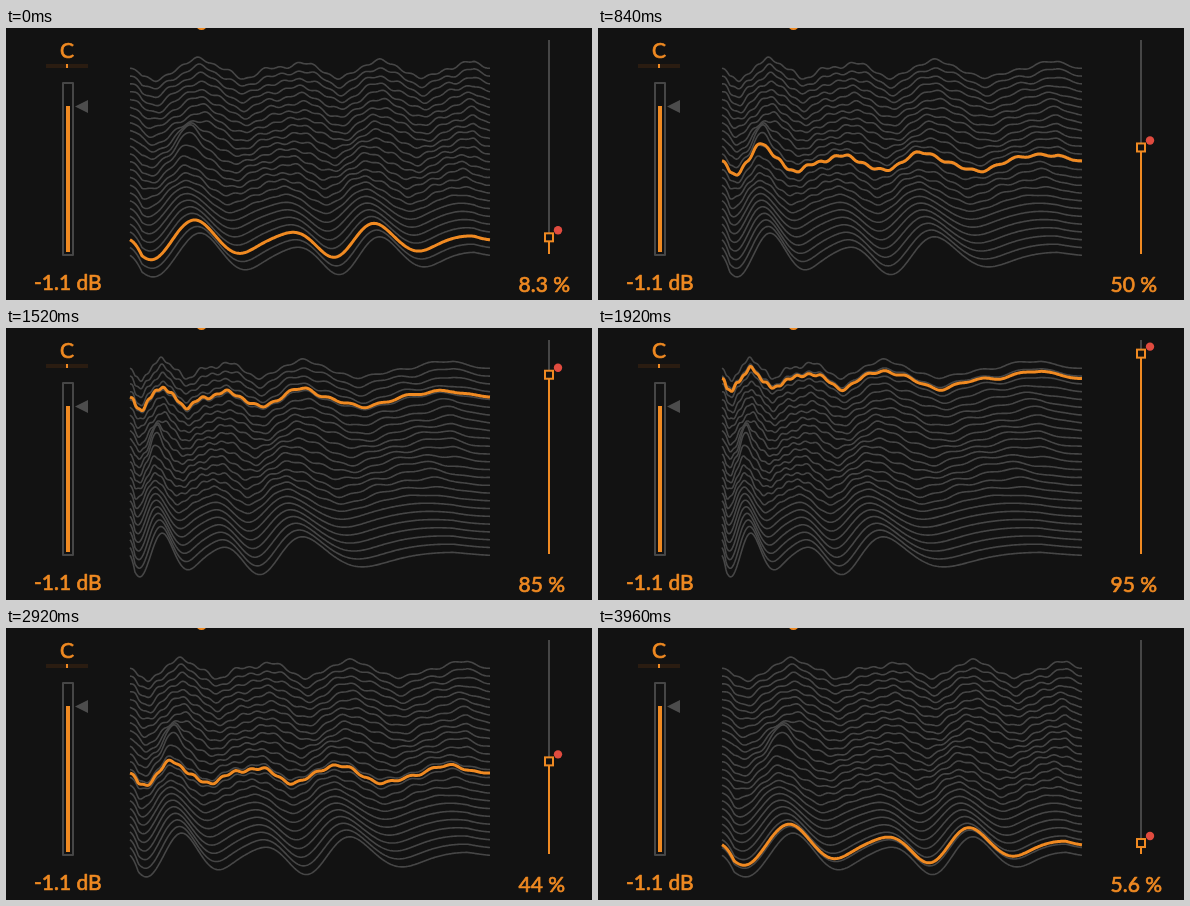
Recreate the animation shown at these times as an HTML page with a canvas. Size 586x272 px, loop 4000 ms.

```html
<!DOCTYPE html>
<html lang="en">
<head>
<meta charset="utf-8">
<title>Wavetable position</title>
<style>
  html, body { margin: 0; width: 100%; height: 100%; overflow: hidden; background: #121212; }
  canvas { display: block; }
</style>
</head>
<body>
<canvas id="stage" width="586" height="272"></canvas>
<script>
const ctx = document.getElementById('stage').getContext('2d');
const LOOP = 4000, STEP = 40;
const ROWS = 24, LEFT = 124, WIDTH = 360;
const BG = '#121212', GREY = '#464646', ORANGE = '#f08a22', RED = '#e04b3f';

// Swells along every wave: centre, height in the bottom row, height in the upper rows.
const swells = [
  [24, 22, 13], [70, -23, -10], [114, 15, 10], [171, -9, -5],
  [210, 21, 10], [248, -20, -8], [293, 12, 10], [344, -3, -7]
];

const mix = (a, b, k) => a + (b - a) * k;
const clamp = v => Math.max(0, Math.min(1, v));
const bell = (v, centre, spread) => Math.exp(-(((v - centre) / spread) ** 2));

function waveOffset(row, x) {
  const lift = clamp(row / 10);
  const spread = mix(23, 15, row / ROWS);
  const lean = 14 * Math.sin(Math.PI * clamp(row / 16)) * clamp(x / 50);
  const rough = 2.2 * clamp((row - 6) / 3);
  let y = -14 * bell(x, 57, 10) * bell(row, 13.3, 1.9);
  for (const [centre, low, high] of swells) y += mix(low, high, lift) * bell(x + lean, centre, spread);
  y += rough * Math.sin(x * 0.27 + row * 0.9) * Math.sin(x * 0.11 - row * 0.4);
  return y * clamp(x / 12) * clamp((WIDTH - x) / 16);
}

function drawWave(row, bend, color, width) {
  ctx.beginPath();
  for (let x = 0; x <= WIDTH; x++) {
    const u = x / WIDTH;
    const source = WIDTH * u * bend / (1 - u + u * bend);
    ctx.lineTo(LEFT + x, 227.3 - 187 * row / ROWS + waveOffset(row, source));
  }
  ctx.strokeStyle = color;
  ctx.lineWidth = width;
  ctx.stroke();
}

function rect(x, y, w, h, color) {
  ctx.fillStyle = color;
  ctx.fillRect(x, y, w, h);
}

function label(text, x, y, align = 'left') {
  ctx.font = '21px Lato, sans-serif';
  ctx.textAlign = align;
  ctx.fillStyle = ctx.strokeStyle = ORANGE;
  ctx.lineWidth = 0.7;
  ctx.fillText(text, x, y);
  ctx.strokeText(text, x, y);
}

function drawMeter() {
  label('C', 61, 30, 'center');
  rect(40, 36, 42, 4, '#2a1c11');
  rect(60, 36, 2, 4, ORANGE);
  ctx.strokeStyle = GREY;
  ctx.lineWidth = 2;
  ctx.strokeRect(57, 55, 10, 172);
  rect(60, 78, 4, 146, ORANGE);
  ctx.fillStyle = '#4c4c4c';
  ctx.beginPath();
  ctx.moveTo(69, 78.5);
  ctx.lineTo(82, 72);
  ctx.lineTo(82, 85);
  ctx.fill();
  label('-1.1 dB', 28, 262);
}

function drawSlider(value) {
  const y = 227 - 213 * value;
  rect(542, 12, 2, 214, GREY);
  rect(542, y, 2, Math.max(0, 226 - y), ORANGE);
  rect(538, y - 5, 10, 10, ORANGE);
  rect(540, y - 3, 6, 6, BG);
  ctx.fillStyle = RED;
  ctx.beginPath();
  ctx.arc(552, y - 7, 4.2, 0, 7);
  ctx.fill();
  const percent = value * 100;
  label(percent.toFixed(percent < 10 ? 1 : 0) + ' %', 512.5, 264);
}

// Rises, falls at the same pace, rests briefly at zero and starts again.
function positionAt(t) {
  const keys = [[0, 0.083], [1819, 0.9965], [3789, 0], [3876, 0], [LOOP, 0.083]];
  const i = keys.findIndex(key => t < key[0]);
  const [t0, v0] = keys[i - 1], [t1, v1] = keys[i];
  return mix(v0, v1, (t - t0) / (t1 - t0));
}

function frame() {
  const t = Math.floor(performance.now() % LOOP / STEP) * STEP;
  const value = positionAt(t);
  const bend = 0.956 + 0.387 * value + 1.635 * value * value;
  rect(0, 0, 586, 272, BG);

  // Descender of a heading cut off by the top edge.
  ctx.beginPath();
  ctx.arc(195.5, -3.5, 4.5, 0, Math.PI);
  ctx.strokeStyle = ORANGE;
  ctx.lineWidth = 2;
  ctx.stroke();

  drawMeter();
  ctx.lineJoin = 'round';
  for (let row = 0; row <= ROWS; row++) drawWave(row, bend, GREY, 1.6);
  drawWave(value * ROWS, bend, ORANGE, 3);
  drawSlider(value);
  requestAnimationFrame(frame);
}
frame();
</script>
</body>
</html>
```
